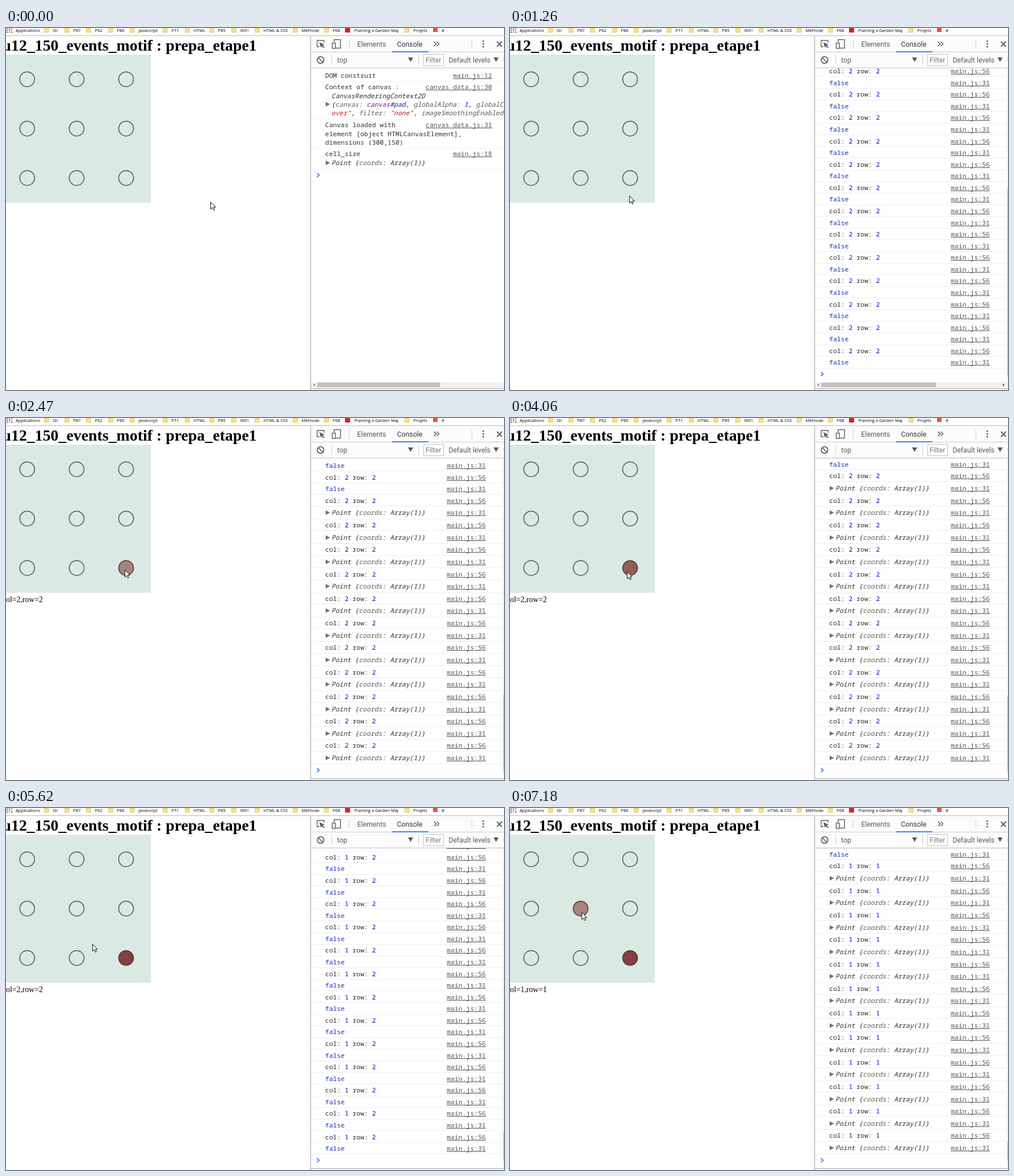
Recreate the animation shown at these times as an HTML page with a canvas. Size 877 by 639 pixels, loop 8 s.

```html
<!DOCTYPE html>
<html lang="fr">
<head>
<meta charset="utf-8">
<title>Console and circles</title>
<style>
html, body { margin: 0; width: 100%; height: 100%; overflow: hidden; background: #fff; }
canvas { display: block; width: 877px; height: 639px; }
</style>
</head>
<body>
<canvas id="stage" width="877" height="639"></canvas>
<script>
const W = 877, H = 639, LOOP = 8000;
const ctx = document.getElementById('stage').getContext('2d');

const MONO = '11.47px "Noto Sans Mono", monospace';
const MONO_I = 'italic ' + MONO;
const UI = '12.3px Roboto, sans-serif';
const SMALL = '500 7.5px "Open Sans", sans-serif';
const SERIF = '13.76px "Liberation Serif", serif';
const TITLE = 'bold 27.85px "Liberation Serif", serif';

const INK = '#303030', GREY = '#5a5a5a', NUM = '#1c00cf', BOOL = '#1a2fb8', RED = '#c41a16';
const BAR = '#fcfcfc';
const ROW = 20.57, POINT_ROW = 22.7, LOG_TOP = 71, HEAD_END = 249.5;
const FILLS = ['#a58480', '#945b5b', '#844043'];

// Cursor path: time, x, y
const PATH = [
  [0, 361, 307], [120, 355, 308], [970, 262, 308], [1110, 212, 301], [1260, 211, 296],
  [1630, 211, 293], [2050, 211, 282], [2190, 211, 277], [2470, 210, 268],
  [4060, 207, 271], [4210, 204, 274], [4630, 182, 283], [5060, 166, 275],
  [5600, 153, 241], [6170, 140, 211], [6450, 133, 194], [6745, 132, 192], [7180, 127, 184]
];
// Screen updates: start, interval, mouse events logged per update
const BURSTS = [
  [0, 0, '0'], [120, 141.4, '00000008'], [1260, 0, '9'], [1630, 140, '6655443'],
  [4060, 0, '1'], [4210, 140, '5999'], [4750, 155, '888'], [5200, 138.5, '88888888'],
  [6320, 130, '88'], [6600, 145, '77444']
];
// Clicks: time, column, row
const CLICKS = [[2470, 2, 2], [4060, 2, 2], [4210, 2, 2], [7180, 1, 1]];

const centerX = i => 37.3 + 87.1 * i;
const centerY = i => 90.5 + 87.1 * i;

function cursorAt(t) {
  const i = PATH.findIndex(p => p[0] > t);
  if (i < 0) return PATH[PATH.length - 1].slice(1);
  const a = PATH[i - 1], b = PATH[i], k = (t - a[0]) / (b[0] - a[0]);
  return [a[1] + (b[1] - a[1]) * k, a[2] + (b[2] - a[2]) * k];
}

const logs = [], steps = [];
let logHeight = HEAD_END - 73.5;
for (const [start, gap, counts] of BURSTS) {
  [...counts].forEach((n, i) => {
    const time = start + gap * i, [x, y] = cursorAt(time);
    const col = Math.floor((x + 6) / 87.1), row = Math.floor((y - 47) / 87.1);
    const hit = Math.hypot(x - centerX(col), y - centerY(row)) < 14;
    for (let j = 0; j < +n; j++) {
      logs.push({ col, row, hit });
      logHeight += ROW + (hit ? POINT_ROW : ROW);
    }
    steps.push({ time, x: Math.round(x), y: Math.round(y), count: logs.length, height: logHeight + ROW });
  });
}

function rect(x, y, w, h, color) {
  ctx.fillStyle = color;
  ctx.fillRect(x, y, w, h);
}

function text(s, x, y, font, color, align = 'left') {
  ctx.font = font;
  ctx.fillStyle = color;
  ctx.textAlign = align;
  ctx.fillText(s, x, y);
}

function runs(x, y, font, ...parts) {
  for (const [s, color] of parts) {
    text(s, x, y, font, color);
    x += ctx.measureText(s).width;
  }
}

function shape(points, fill, stroke, width = 1, close = true) {
  ctx.beginPath();
  points.forEach(([x, y], i) => i ? ctx.lineTo(x, y) : ctx.moveTo(x, y));
  if (close) ctx.closePath();
  if (fill) { ctx.fillStyle = fill; ctx.fill(); }
  if (stroke) { ctx.strokeStyle = stroke; ctx.lineWidth = width; ctx.stroke(); }
}

function disc(x, y, r, fill, stroke, width = 1) {
  ctx.beginPath();
  ctx.arc(x, y, r, 0, Math.PI * 2);
  if (fill) { ctx.fillStyle = fill; ctx.fill(); }
  if (stroke) { ctx.strokeStyle = stroke; ctx.lineWidth = width; ctx.stroke(); }
}

const down = (x, y) => shape([[x - 4.5, y - 4], [x + 4.5, y - 4], [x, y + 4]], '#5a5a5a');
const expand = y => shape([[563, y - 4], [563, y + 4], [570.5, y]], '#6e6e6e');

function link(s, right, y) {
  text(s, right, y, MONO, '#545454', 'right');
  const w = ctx.measureText(s).width;
  rect(right - w, y + 1, w, 1, '#545454');
}

function bookmarks() {
  const colors = ['#e0483e', '#3f9d58', '#4a80e8', '#e8b52c'];
  for (let i = 0; i < 9; i++) rect(1 + (i % 3) * 4, -1 + Math.floor(i / 3) * 3.6, 2.4, 2.4, colors[(i * 2 + (i > 4)) % 4]);
  text('Applications', 17, 6.5, SMALL, '#000');
  const folders = [[67, 'ISI'], [103, 'P87'], [141, 'P62'], [180, 'P86'], [218, 'Javascript'], [276, 'P71'],
    [315, 'HTML'], [358, 'P85'], [397, 'W01'], [438, 'HTML & CSS'], [505, 'Méthode'], [560, 'P68'], [702, 'Projets']];
  for (const [x, name] of folders) {
    rect(x, 0, 8.5, 8, '#e9c55f');
    rect(x + 1, 1, 6.5, 6, '#fbe08d');
    text(name, x + 15.5, 6.5, SMALL, '#000');
  }
  rect(597, 0, 9, 8, '#d8231f');
  ctx.save();
  ctx.beginPath();
  ctx.rect(610, 0, 81, 12);
  ctx.clip();
  text('Planting a Garden Map', 613.5, 6.5, SMALL, '#000');
  ctx.restore();
  rect(752, 0, 8, 7, '#e2543c');
  text('#', 767, 6.5, SMALL, '#000');
  rect(0, 13, W, 1, '#b9b9b9');
}

function page(t) {
  text('u12_150_events_motif : prepa_etape1', 441.5, 40, TITLE, '#000', 'right');
  rect(0, 47, 255, 261.6, '#daeae2');
  const done = CLICKS.filter(c => c[0] <= t);
  for (let c = 0; c < 3; c++) for (let r = 0; r < 3; r++) {
    const level = done.filter(k => k[1] === c && k[2] === r).length;
    disc(centerX(c), centerY(r), 13.05, level && FILLS[level - 1], level ? '#573638' : '#525652', 1.5);
  }
  if (done.length) {
    const [, c, r] = done[done.length - 1];
    text(`col=${c},row=${r}`, -6, 324.5, SERIF, '#000');
  }
}

function toolbar() {
  rect(537, 14, 340, 57, BAR);
  rect(537, 42, 340, 1, '#cccccc');
  rect(537, 70, 340, 1, '#c4c4c4');
  rect(680, 41, 64, 2, '#4285e8');

  shape([[552, 33], [548, 33], [548, 22], [560, 22], [560, 26]], null, '#5a5a5a', 1.3, false);
  shape([[552, 25], [561, 29.5], [557.5, 30.5], [561, 34], [559.5, 35.5], [556, 32], [554.5, 35]], '#5a5a5a');
  ctx.strokeStyle = '#5a5a5a';
  ctx.lineWidth = 1.4;
  ctx.strokeRect(578, 20.5, 11, 15);
  rect(573, 25, 8, 12, BAR);
  ctx.strokeRect(574.5, 26.5, 5.5, 9.5);

  for (const [x, y] of [[604, 20], [820, 20], [573, 48], [726, 48]]) rect(x, y, 1, 16, '#cccccc');
  text('Elements', 618.5, 33, UI, GREY);
  text('Console', 688.5, 33, UI, '#333');
  for (const x of [753.5, 758.5]) shape([[x, 24], [x + 4, 28], [x, 32]], null, '#5a5a5a', 1.5, false);
  for (const y of [23, 28, 33]) disc(840.5, y, 1.5, '#5a5a5a');
  shape([[864.5, 24], [873.5, 33]], null, '#5a5a5a', 1.8, false);
  shape([[873.5, 24], [864.5, 33]], null, '#5a5a5a', 1.8, false);

  disc(554, 56.5, 5.8, null, '#5a5a5a', 1.7);
  shape([[550, 52.5], [558, 60.5]], null, '#5a5a5a', 1.7, false);
  text('top', 583, 61, UI, GREY);
  down(712.5, 56);
  rect(735, 46, 36, 21, '#c0c0c0');
  rect(736, 47, 34, 19, '#fff');
  text('Filter', 739, 61, UI, '#777');
  text('Default levels', 779.5, 61, UI, GREY);
  down(863, 56);
  rect(876, 53, 1, 6, '#cccccc');
}

function header() {
  text('DOM construit', 562, 88, MONO, INK);
  link('main.js:12', 856, 88);
  text('Context of canvas :', 562, 108, MONO, INK);
  link('canvas_data.js:30', 856, 108);
  text('CanvasRenderingContext2D', 573, 124, MONO_I, INK);
  expand(134.5);
  runs(573, 139, MONO_I, ['{', INK], ['canvas: ', GREY], ['canvas', '#881280'], ['#pad', '#1a1aa6'],
    [', ', INK], ['globalAlpha: ', GREY], ['1', NUM], [', ', INK], ['globalC', GREY]);
  runs(573, 154, MONO_I, ['over"', RED], [', ', INK], ['filter: ', GREY], ['"none"', RED],
    [', ', INK], ['imageSmoothingEnabled', GREY]);
  text('Canvas loaded with', 562, 175, MONO, INK);
  link('canvas_data.js:31', 856, 175);
  text('element [object HTMLCanvasElement],', 562, 191, MONO, INK);
  text('dimensions (300,150)', 562, 206, MONO, INK);
  text('cell_size', 562, 226, MONO, INK);
  link('main.js:18', 856, 226);
  pointText(242);
  for (const y of [94, 161, 212, 249]) rect(537, y, 340, 1, '#f5f5f5');
}

function pointText(y) {
  expand(y - 4);
  runs(573, y, MONO_I, ['Point {', INK], ['coords', GREY], [': Array(1)}', INK]);
}

function logRow(e, first, top, h, right) {
  const y = Math.round(top + h / 2 + 4);
  if (first) {
    runs(562, y, MONO, ['col: ', INK], [e.col, NUM], [' row: ', INK], [e.row, NUM]);
  } else if (e.hit) {
    pointText(y);
  } else {
    text('false', 562, y, MONO, BOOL);
  }
  link('main.js:' + (first ? 56 : 31), right, y);
  rect(537, Math.round(top + h) - 1, right + 30 - 537, 1, '#eeeeee');
}

function consolePanel(t, step) {
  const wide = t < 1630;
  const scrolled = step.height > 552;
  const right = scrolled ? 845 : 856;
  const bottom = scrolled ? (wide ? 621.25 : 632) : 73.5 + step.height;
  ctx.save();
  ctx.beginPath();
  ctx.rect(537, LOG_TOP, 340, (wide ? 625 : 635) - LOG_TOP);
  ctx.clip();
  if (!scrolled) header();
  let y = bottom - ROW;
  const py = y + ROW / 2;
  shape([[547.5, py - 3.5], [551.5, py], [547.5, py + 3.5]], null, '#367cf1', 1.7, false);
  for (let i = step.count - 1; i >= 0 && y > LOG_TOP; i--) {
    const e = logs[i], h = e.hit ? POINT_ROW : ROW;
    logRow(e, false, y -= h, h, right);
    logRow(e, true, y -= ROW, ROW, right);
  }
  if (scrolled) {
    const end = wide ? 614 : 623, track = end - 81;
    const thumb = track * (end + 11 - 70) / step.height;
    rect(875, LOG_TOP, 2, 565, '#f1f1f1');
    rect(876, end - thumb, 1, thumb, '#b8b8b8');
  }
  ctx.restore();

  if (wide) {
    rect(537, 625, 340, 10, '#f1f1f1');
    rect(548, 626, scrolled ? 202 : 216.5, 8, '#c1c1c1');
    shape([[544, 627.5], [544, 632.5], [541, 630]], '#7a7a7a');
    if (scrolled) shape([[868, 627.5], [868, 632.5], [871, 630]], '#505050');
  }
  rect(537, 635, 340, 4, BAR);
  rect(537, 636, 340, 1, '#a8a8a8');
  rect(536, 14, 1, 625, '#a3a3a3');
}

function pointer(x, y) {
  const outline = [[0, 0], [0, 12.5], [2.8, 9.8], [4.8, 14.2], [6.8, 13.3], [4.9, 9], [8.6, 9]];
  shape(outline.map(([a, b]) => [x + a - 0.5, y + b + 0.3]), '#fff', '#111', 1);
}

function draw(t) {
  const step = steps.filter(s => s.time <= t).pop();
  rect(0, 0, W, H, '#fff');
  page(t);
  bookmarks();
  consolePanel(t, step);
  toolbar();
  pointer(step.x, step.y);
}

const origin = performance.now();
function frame() {
  draw((performance.now() - origin) % LOOP);
  requestAnimationFrame(frame);
}
frame();
</script>
</body>
</html>
```
